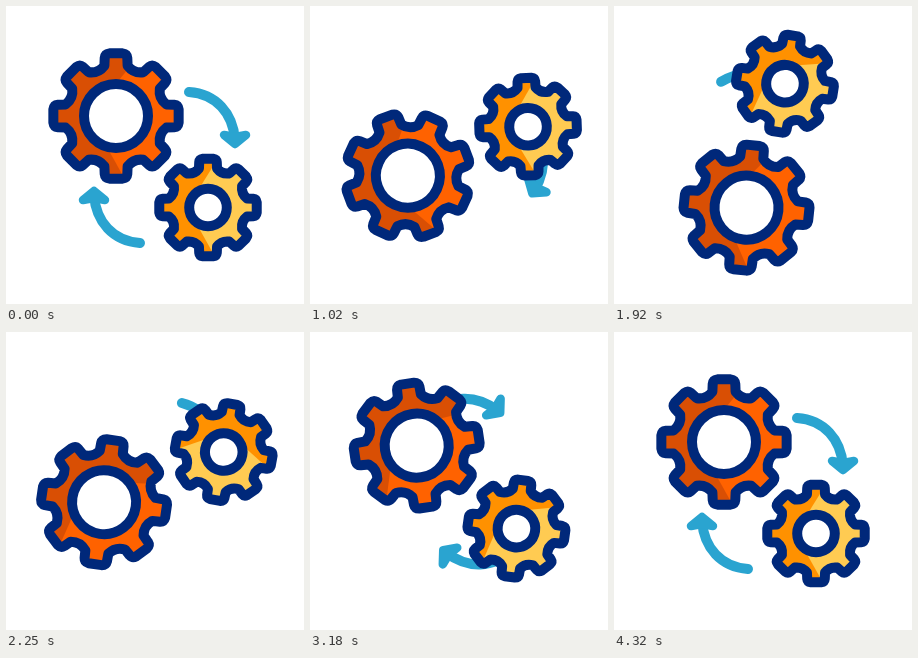
Animation, 298 px wide and 298 px high, one loop 4740 ms. Source, as an HTML page:

```html
<!DOCTYPE html>
<html lang="en">
<head>
<meta charset="utf-8">
<title>Turning gears</title>
<style>
html, body { margin: 0; width: 100%; height: 100%; overflow: hidden; background: #fff }
svg { display: block; width: 100%; height: 100% }
.line { stroke: #00287a; stroke-width: 10; stroke-linejoin: round }
.arrow { stroke: #2aa4d0; stroke-linecap: round; stroke-linejoin: round }
</style>
</head>
<body>
<svg viewBox="0 0 298 298">
  <defs>
    <g id="arrow" class="arrow">
      <path d="M183 86C210 88 227 107 229 134" fill="none" stroke-width="10"/>
      <path d="M218 129L229 138L240 129L229 131Z" fill="#2aa4d0" stroke-width="8.5"/>
    </g>
  </defs>
  <g id="arrows">
    <use href="#arrow"/>
    <use href="#arrow" transform="rotate(180 158.5 161.5)"/>
  </g>
  <g id="pair">
    <g id="big"></g>
    <g id="small"></g>
  </g>
</svg>
<script>
const LOOP = 4740;
const $ = id => document.getElementById(id);

function polar(r, deg) {
  const a = deg * Math.PI / 180;
  return (r * Math.cos(a)).toFixed(2) + ' ' + (r * Math.sin(a)).toFixed(2) + ' ';
}

// Eight rounded teeth; r is the radius at their tops.
function outline(r) {
  const base = r * .82;
  let d = 'M' + polar(base, -13);
  for (let a = 0; a < 360; a += 45) {
    d += 'L' + polar(r * .94, a - 11) + 'Q' + polar(r, a - 10) + polar(r, a - 6) +
      'L' + polar(r, a + 6) + 'Q' + polar(r, a + 10) + polar(r * .94, a + 11) +
      'L' + polar(base, a + 13) + 'Q' + polar(r * .73, a + 22.5) + polar(base, a + 32);
  }
  return d + 'Z';
}

// The light side starts at a fold whose upper end lies at x = top * r.
function drawGear(id, r, hole, dark, light, top) {
  const d = outline(r);
  $(id).innerHTML = `
    <clipPath id="${id}Clip"><path d="${d}"/></clipPath>
    <path d="${d}" fill="${dark}"/>
    <path d="M${-.42 * r} 0L${top * r} ${-r}H${r}V${r}H${.14 * r}Z" fill="${light}" clip-path="url(#${id}Clip)"/>
    <path d="${d}" class="line" fill="none"/>
    <circle r="${hole}" class="line" fill="#fff"/>`;
}

// Cubic Bezier easing, solved by bisection.
function bezier(x1, y1, x2, y2) {
  const at = (a, b, s) => 3 * (1 - s) * (1 - s) * s * a + 3 * (1 - s) * s * s * b + s ** 3;
  return u => {
    let lo = 0, hi = 1;
    for (let i = 0; i < 20; i++) {
      const mid = (lo + hi) / 2;
      if (at(x1, x2, mid) < u) lo = mid; else hi = mid;
    }
    return at(y1, y2, lo);
  };
}

const smooth = bezier(1 / 3, 0, 2 / 3, 1);
const settle = bezier(.25, .1, .2, 1);

function progress(t, from, to, ease) {
  return ease(Math.min(1, Math.max(0, (t - from) / (to - from))));
}

function place(id, x, y, angle) {
  $(id).setAttribute('transform', `translate(${x} ${y}) rotate(${angle})`);
}

function draw() {
  const t = (performance.now() - start) % LOOP;
  const swing = 131 * (progress(t, 300, 1720, smooth) - progress(t, 1720, 3700, settle));
  const spin = 174 * (progress(t, 300, 2040, smooth) - progress(t, 2040, 3900, smooth));
  const orbit = 360 * progress(t, 300, 4050, smooth);
  $('arrows').setAttribute('transform', `rotate(${orbit} 147 152)`);
  place('pair', 149, 149, -swing);
  place('big', -39, -39, spin * .72);
  place('small', 53, 52.5, spin);
  requestAnimationFrame(draw);
}

drawGear('big', 63, 32, '#d94f04', '#ff6200', .4);
drawGear('small', 49, 18.8, '#ff9100', '#ffcb52', .2);
const start = performance.now();
draw();
</script>
</body>
</html>
```
